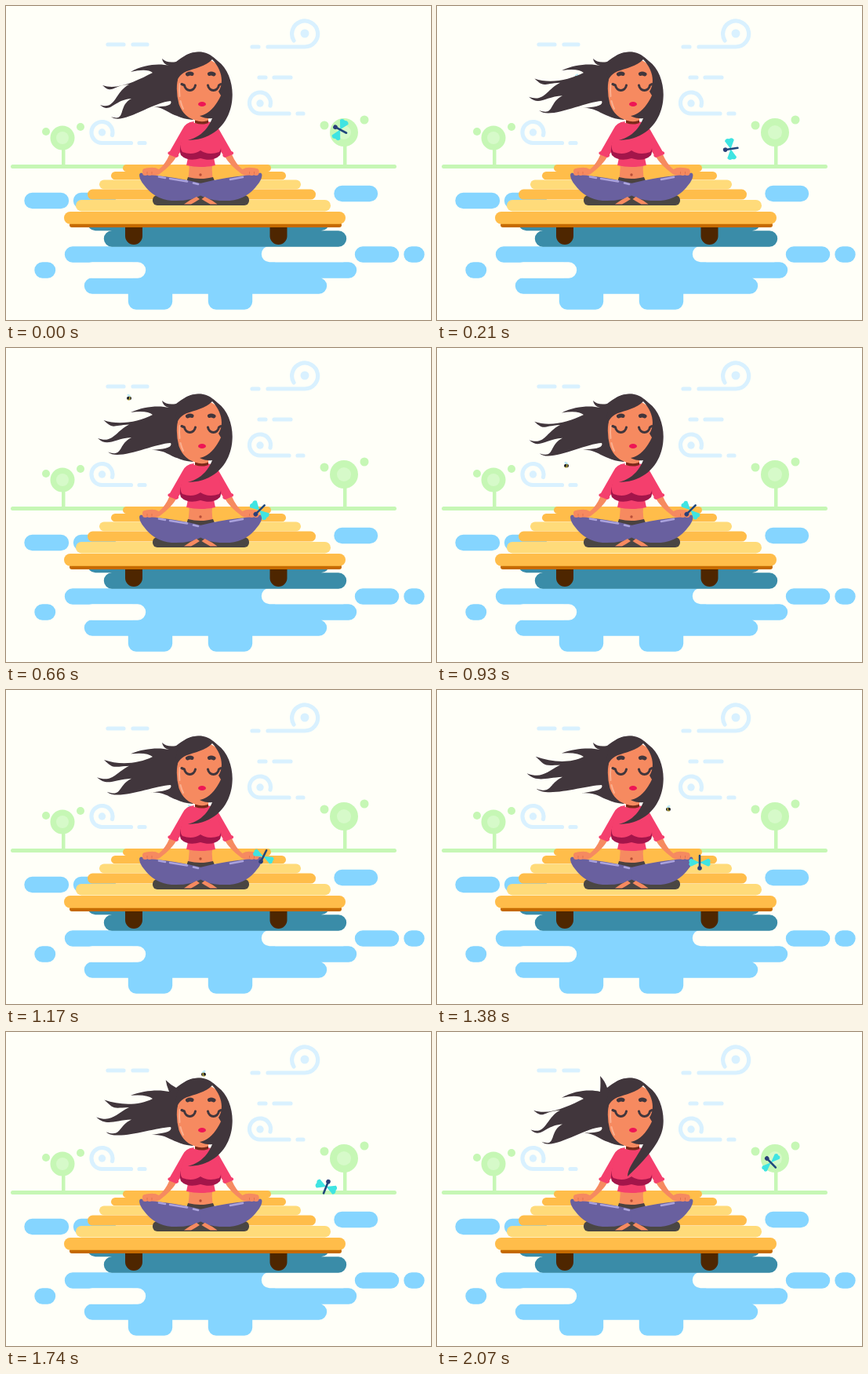
These frames come from a looping animation (542x400 px, 2100 ms). An HTML page:

```html
<!DOCTYPE html>
<html lang="en">
<head>
<meta charset="utf-8">
<title>Meditation on the pier</title>
<style>
html, body { margin: 0; width: 100%; height: 100%; overflow: hidden; background: #fffff8; }
svg { display: block; width: 100%; height: 100%; }
.line { fill: none; stroke-linecap: round; stroke-linejoin: round; }
.wind { stroke: #d9f1ff; stroke-width: 5.2; }
.row { stroke-width: 20.4; }
.hair { fill: #41363c; }
.skin { fill: #f68a60; }
.shirt { fill: #f43f6d; }
</style>
</head>
<body>
<svg viewBox="0 0 542 400">
  <g class="line wind">
    <path d="M130 49H150M162 49H180M314 52H322M334 52H381A16.5 16.5 0 1 0 367 44"/>
    <path d="M323 91H331M342 91H363M372 137H379M170 174.5H177"/>
    <path id="curl" d="M337 127A13.5 13.5 0 1 0 324.500 137H361"/>
    <use href="#curl" x="-201.500" y="37.500"/>
  </g>
  <g fill="#d9f1ff">
    <circle cx="381" cy="35" r="5.500"/><circle cx="324" cy="124" r="4.700"/><circle cx="122.500" cy="161" r="4.700"/>
  </g>

  <g fill="#c6f7b5">
    <rect x="6" y="202" width="492" height="5" rx="2.500"/>
    <rect x="71" y="165" width="4.500" height="38"/>
    <rect x="430" y="165" width="4.500" height="38"/>
    <circle cx="72" cy="168" r="15.500"/><circle cx="51" cy="160" r="5"/><circle cx="95" cy="154" r="5"/>
    <circle cx="431" cy="161" r="18"/><circle cx="406" cy="152" r="5.500"/><circle cx="457" cy="145" r="5.500"/>
  </g>
  <g fill="#d6fac9"><circle cx="72" cy="168" r="8"/><circle cx="431" cy="161" r="9"/></g>

  <!-- lake -->
  <g class="line row">
    <path stroke="#85d5ff" d="M33.500 248H70M96 248H130M428.500 239H464M455 316.500H491M517.500 316.500H523.500M46.500 336.500H53
      M85 316.500H340M165 336.500H437M110 356.500H399M166 362V376.500H202V362M268 362V376.500H304V362"/>
    <path stroke="#fffff8" d="M336 316H430M110 336.500H168"/>
    <path stroke="#3a8ca8" d="M114 276H402M135 296.500H424"/>
  </g>

  <!-- pier -->
  <path class="line" stroke="#c56a00" stroke-width="6" d="M84 279H425"/>
  <g id="planks"></g>
  <path fill="#4e2600" d="M152 282H174V293A11 11 0 0 1 152 293ZM336.500 282H358.500V293A11 11 0 0 1 336.500 293Z"/>
  <rect x="187" y="241" width="123" height="13" rx="6" fill="#4a4643"/>

  <g id="bee">
    <ellipse cx="-2" cy="-2.500" rx="2.600" ry="1.600" fill="#bfeaf5" transform="rotate(35)"/>
    <ellipse rx="3" ry="2.300" fill="#25262a"/>
    <path d="M.8 -2V2M-1.500 1.500L-.5 2.500" stroke="#e8d23c" stroke-width="1.100"/>
  </g>

  <path class="hair" id="mane"/>

  <!-- body -->
  <path class="skin" d="M233 198H264Q261 210 265 224H231Q235 210 233 198ZM241 136H258V151H241Z"/>
  <circle cx="248" cy="215" r="1.700" fill="#b84e38"/>
  <g id="arm">
    <path class="skin" d="M209 188L218 191Q211 203 196 214Q190 218 183 215Q174 218 174 212Q173 206 183 206Q190 205 195 208Q203 202 209 188Z"/>
    <path class="shirt" d="M240 147Q229 148 225 157L209 185Q205 186 207 189L217 193Q221 192 220 189Q227 180 234 168Z"/>
  </g>
  <use href="#arm" transform="matrix(-1 0 0 1 496.500 0)"/>
  <path class="shirt" d="M232 188H265Q265 196 267 203Q248 207 230 203Q232 196 232 188Z"/>
  <path fill="#a3154a" d="M229 164Q219 180 223 190Q232 199 248 194Q264 199 273 190Q277 180 268 164Z"/>
  <path class="shirt" d="M235 148Q248 151 262 148Q271 152 271 165Q277 181 272 186Q258 191 248 184Q238 191 225 186Q220 181 226 165Q226 152 235 148Z"/>
  <path d="M241 145.500Q250 149 258 145.500V149Q250 152 241 149Z" fill="#7b2a1a"/>
  <path fill="#4a4240" d="M232 218Q248 222 264 218L268 227H229Z"/>
  <g id="leg">
    <path fill="#69609f" d="M170 215Q171 210 177 215Q202 216 232 222L249 226V241Q236 249 211 248Q189 246 176 228Q170 221 170 215Z"/>
    <path class="skin" d="M227 252.500Q234 247 243 243L247 246Q241 250 236 252.500Z"/>
    <g class="skin">
      <rect x="174" y="207" width="7" height="9" rx="3.500"/><rect x="180" y="207" width="6" height="9" rx="3"/>
      <rect x="186" y="207" width="6" height="8" rx="3"/>
    </g>
    <path d="M180 211V214M186 211V214" stroke="#dc6c4c" stroke-width=".8"/>
  </g>
  <use href="#leg" transform="matrix(-1 0 0 1 496.500 0)"/>
  <path class="line" stroke="#aaa2dd" stroke-width="2.500" d="M195 217.500L203 219M209 220L231 223.500M239 225.500L245 227M302 218L286 221"/>

  <!-- head -->
  <path class="skin" d="M218.500 96Q221 72 246 67Q272 66 279 92Q281 118 268 136Q258 147 244 146Q227 143 220.500 125Q216.500 110 218.500 96Z"/>
  <path class="line" stroke="#fbb090" stroke-width="2" d="M221.500 99Q220.500 108 221.500 115M222.500 121Q224 127 226 131"/>
  <g class="line" stroke="#41363c">
    <path stroke-width="5" d="M231.500 87Q234.500 85.500 237 86.500M259.500 86.500Q262 85.500 265 87"/>
    <path stroke-width="3" d="M224 99.500L227.500 101C229 109.500 240 109.500 241.500 101M257.500 101C259 109.500 270 109.500 271.500 101L274 99.500"/>
  </g>
  <ellipse cx="250" cy="125" rx="5" ry="3" fill="#ee1555"/>
  <path class="hair" id="lock"/>

  <g id="fly">
    <g id="wings" fill="#3fe4e2">
      <path id="wing" d="M0 -1L11 -7Q15 -5 13 -1Q15 3 11 5Z"/>
      <use href="#wing" transform="scale(-1 1)"/>
    </g>
    <path class="line" stroke="#20487c" stroke-width="2.600" d="M0 -7V8"/>
    <circle cy="-8" r="2.800" fill="#2b3f78"/>
  </g>
</svg>
<script>
const LOOP = 2100, STEP = 30;
const $ = id => document.getElementById(id);

// Each plank nearer the viewer is wider and thicker
for (let i = 0; i < 6; i++) {
  const left = 149 - 15 * i, right = 338 + 19 * i, top = 202 + 8.25 * i + .75 * i * i, h = 9 + 1.35 * i;
  const fill = i > 1 && i % 2 == 0 ? '#ffdb7a' : '#ffbd4a';
  $('planks').innerHTML +=
    `<rect x="${left}" y="${top}" width="${right - left}" height="${h}" rx="${h / 2}" fill="${fill}"/>`;
}

// Key points: time, then values
const beePath = [
  [0, 232, 92], [450, 116, 91], [540, 106, 78], [660, 157, 64], [930, 165, 150],
  [1380, 295, 152], [1740, 252, 54], [LOOP, 232, 92]
];
const flyPath = [
  [0, 427, 158, -62], [420, 324, 206, -135], [1020, 324, 206, -135],
  [1380, 335, 219, -180], [1740, 408, 198, -338], [LOOP, 428, 164, -410]
];
const droopPath = [[0, 1], [450, 0], [660, .5], [930, .6], [1380, .1], [1740, .2], [LOOP, 1]];

function along(path, t) {
  const i = path.findIndex(p => p[0] > t), a = path[i - 1], b = path[i];
  const u = (t - a[0]) / (b[0] - a[0]);
  return a.slice(1).map((v, n) => v + (b[n + 1] - v) * u);
}

const clamp = u => Math.max(0, Math.min(1, u));
const bump = (t, centre, width) => {
  const u = clamp(1 - Math.abs(t - centre) / width);
  return u * u * (3 - 2 * u);
};

// A tapering, slightly hooked strand from one root out to its tip and back to the next root
function strand([x0, y0], [x, y], [x1, y1]) {
  return `C${x0 - 18} ${y0 + 9} ${x + 20} ${y + 7} ${x} ${y}` +
    `C${x + 13} ${y + 12} ${x1 - 22} ${y1 + 1} ${x1} ${y1}`;
}

function drawHair(t) {
  const [droop] = along(droopPath, t);
  const rise = clamp((t - 1380) / 690);
  const kx = 199 + 9 * rise, ky = 67 - 11 * rise;
  const roots = [[187, 85], [157, 95 + 5 * droop], [160, 110 + 8 * droop], [210, 121]];
  const tips = [[126 - 3 * droop, 83 + 18 * droop], [114 + 6 * droop, 104 + 22 * droop], [126 + 8 * droop, 124 + 17 * droop]];
  $('mane').setAttribute('d',
    `M250 59C236 57 226 64 217 71Q${kx + 6} ${ky + 6} ${kx} ${ky}Q${kx + 1} ${ky + 7} 208 76` +
    `C196 73 176 74 159 ${80 + 4 * droop}Q180 79 187 85` +
    tips.map((tip, i) => strand(roots[i], tip, roots[i + 1])).join('') +
    `C213 127 202 129 ${183 + 5 * droop} ${132 - 4 * droop}C203 130 208 137 218 140Q226 144 238 145L260 120L266 75Z`);

  const long = bump(t, 450, 150) + bump(t, 2070, 150);
  const lx = 232 + 11 * long, ly = 171 + 13 * long;
  $('lock').setAttribute('d',
    'M218 97C213 74 226 59 245 58.500C258 58 264 65 270 70C284 80 290 101 288.500 118' +
    `C287 141 ${272 - 10 * long} ${170 - 4 * long} ${lx} ${ly}` +
    `C${lx + 16 * (1 - long)} ${ly - 4 - 8 * long} 258 156 263 143` +
    'C257 144 251 142 247 140C258 138 267 129 274 114L271 109C278 98 276 82 263 68' +
    'C252 80 232 80 224 87Q219 91 218 97Z');
}

function draw(t) {
  const [bx, by] = along(beePath, t), [ahead] = along(beePath, t + 15);
  $('bee').setAttribute('transform', `translate(${bx} ${by}) scale(${ahead < bx ? -1 : 1} 1)`);

  const [fx, fy, turn] = along(flyPath, t);
  $('fly').setAttribute('transform', `translate(${fx} ${fy}) rotate(${turn})`);
  $('wings').setAttribute('transform', `scale(1 ${.85 + .15 * Math.cos(t / 35)})`);

  drawHair(t);
}

function frame(now) {
  draw(Math.floor(now % LOOP / STEP) * STEP);
  requestAnimationFrame(frame);
}
draw(0);
requestAnimationFrame(frame);
</script>
</body>
</html>
```
